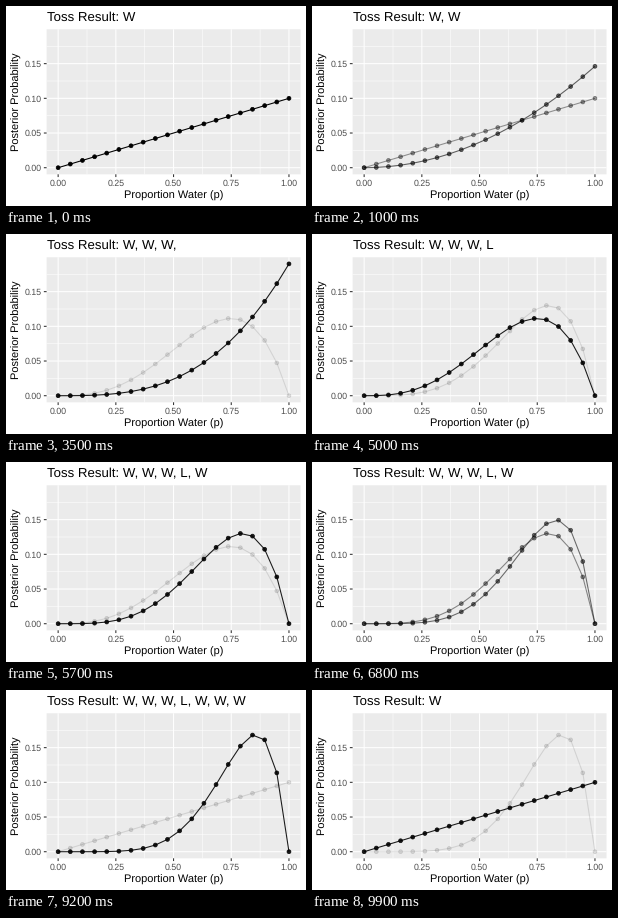
A matplotlib script that plays this animation: 300x200 px, repeating every 10000 ms.

```python
import numpy as np
import matplotlib.pyplot as plt
from matplotlib.animation import FuncAnimation
from matplotlib.collections import PatchCollection
from matplotlib.patches import Circle, Rectangle

plt.rcParams["font.family"] = "Liberation Sans"
plt.rcParams["text.hinting"] = "none"

W, H, DPI = 300, 200, 100
PT = 72 / DPI  # points per pixel
LEFT, RIGHT, TOP, BOTTOM = 40.6, 294.5, 23.3, 168.3
Y_MAX = 0.19

TOSSES = ["W", "W, W", "W, W, W,", "W, W, W, L", "W, W, W, L, W",
          "W, W, W, L, W, W", "W, W, W, L, W, W, W"]
COUNTS = [(1, 0), (2, 0), (3, 0), (3, 1), (4, 1), (5, 1), (6, 1)]  # water, land
FADES = [(5, 10), (20, 10), (35, 10), (50, 9), (64, 9), (78, 9), (92, 9)]  # start, length
FRAMES = 100


def sx(p):
    return LEFT + (RIGHT - LEFT) * (p + 0.05) / 1.1


def sy(v):
    return BOTTOM - (BOTTOM - TOP) * (v / Y_MAX + 0.05) / 1.1


def posterior(water, land, p):
    like = p ** water * (1 - p) ** land
    return like / like.sum()


fig = plt.figure(figsize=(W / DPI, H / DPI), dpi=DPI, facecolor="white")
ax = fig.add_axes([0, 0, 1, 1])
ax.set(xlim=(0, W), ylim=(H, 0))
ax.axis("off")


def segment(x, y, color, width, z):
    ax.plot(x, y, color=color, lw=width * PT, zorder=z, snap=False,
            solid_capstyle="butt")


def label(x, y, text, size, color="black", **kw):
    return ax.text(x, y, text, fontsize=size * PT, color=color, **kw)


def draw_panel():
    ax.add_patch(Rectangle((LEFT, TOP), RIGHT - LEFT, BOTTOM - TOP,
                           fc="#EBEBEB", ec="none", zorder=0, snap=False))
    for p in np.arange(0.125, 1, 0.25):
        segment([sx(p)] * 2, [TOP, BOTTOM], "white", 0.53, 1)
    for v in np.arange(0.025, 0.19, 0.05):
        segment([LEFT, RIGHT], [sy(v)] * 2, "white", 0.53, 1)
    for p in np.linspace(0, 1, 5):
        x = sx(p)
        segment([x, x], [TOP, BOTTOM], "white", 1.07, 2)
        segment([x, x], [BOTTOM, BOTTOM + 2.75], "#333333", 1.07, 2)
        label(x, 179.8, f"{p:.2f}", 8.8, "#4D4D4D", ha="center")
    for v in np.linspace(0, 0.15, 4):
        y = sy(v)
        segment([LEFT, RIGHT], [y, y], "white", 1.07, 2)
        segment([LEFT - 2.75, LEFT], [y, y], "#333333", 1.07, 2)
        label(LEFT - 4.95, y + 3.15, f"{v:.2f}", 8.8, "#4D4D4D", ha="right")
    label((LEFT + RIGHT) / 2, 192.6, "Proportion Water (p)", 11, ha="center")
    label(13.5, (TOP + BOTTOM) / 2, "Posterior Probability", 11, rotation=90,
          ha="right", va="center", rotation_mode="default").set(
              ha="center", va="baseline", rotation_mode="anchor")


def make_curve(water, land):
    p = np.linspace(0, 1, 20)
    x, y = sx(p), sy(posterior(water, land, p))
    line, = ax.plot(x, y, color="black", lw=1.07 * PT, zorder=3,
                    solid_joinstyle="round", solid_capstyle="butt")
    dots = PatchCollection([Circle(c, 1.954) for c in zip(x, y)], fc="black",
                           ec="black", lw=0.709 * PT, zorder=4)
    ax.add_collection(dots)
    return line, dots


draw_panel()
curves = [make_curve(*c) for c in COUNTS]
title = label(LEFT, 15, "", 13.2)


def update(i):
    alphas = [0.0] * len(curves)
    current = 0
    alphas[0] = 1.0
    for j, (start, length) in enumerate(FADES):
        if i < start:
            break
        step = min(i - start + 1, length)
        nxt = (j + 1) % len(curves)
        alphas = [0.0] * len(curves)
        alphas[j], alphas[nxt] = 1 - step / length, step / length
        current = nxt if step > (length + 1) // 2 else j
    for parts, a in zip(curves, alphas):
        for part in parts:
            part.set_alpha(a)
            part.set_visible(a > 0)
    title.set_text("Toss Result: " + TOSSES[current])
    return [title, *(part for parts in curves for part in parts)]


anim = FuncAnimation(fig, update, frames=FRAMES, interval=100,
                     repeat=True, repeat_delay=0, blit=False)
plt.show()
```
